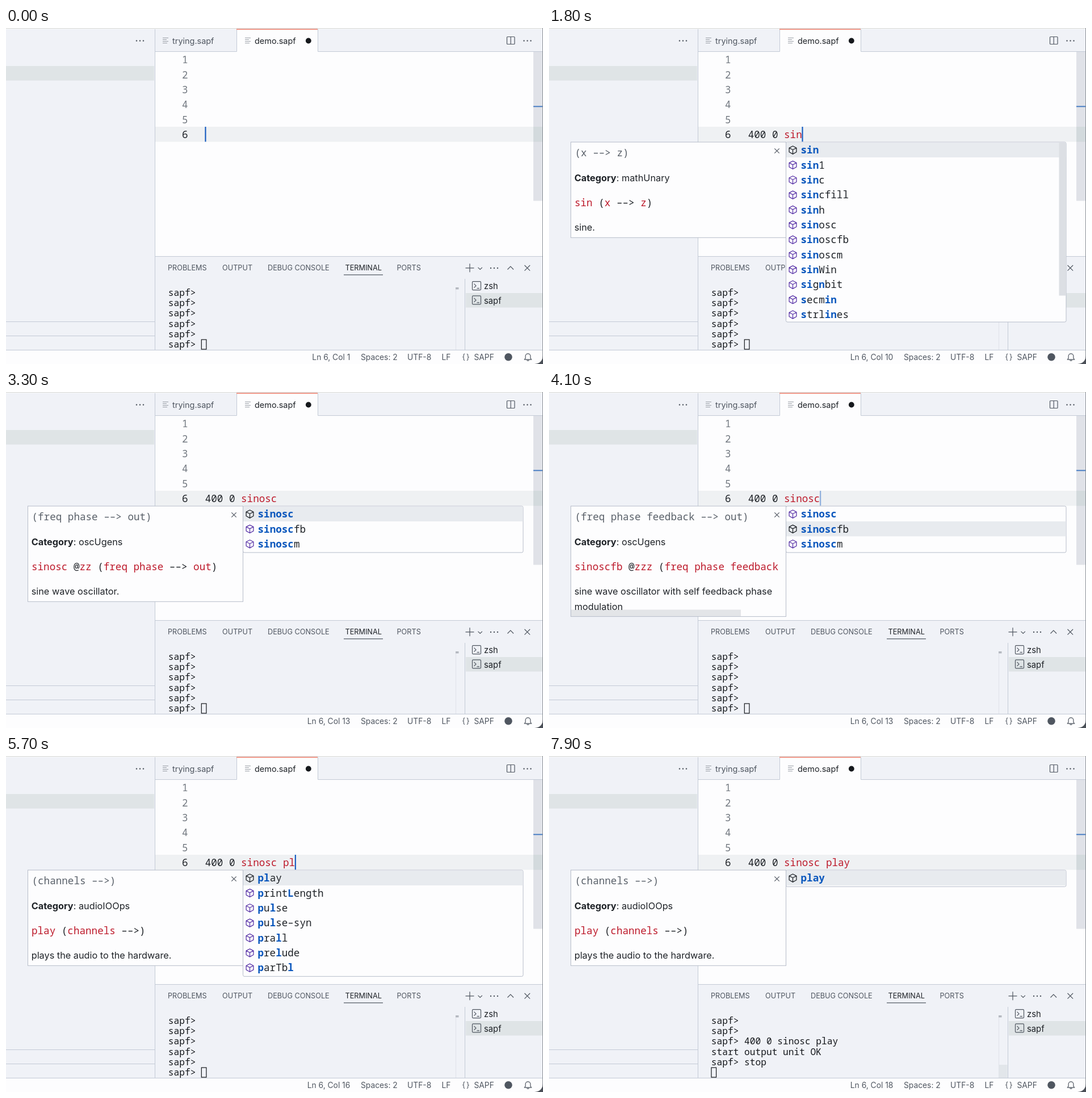
An HTML page that plays this animation: 946x592 px, repeating every 8000 ms.

```html
<!DOCTYPE html>
<html lang="en">
<head>
<meta charset="utf-8">
<title>Editor completion demo</title>
<style>
html, body { margin: 0; width: 100%; height: 100%; overflow: hidden; background: #fdfdfe; }
svg { display: block; }
text { white-space: pre; font: 13.8px Inter, sans-serif; fill: #4f5660; }
.tab { font-size: 14.45px; }
.caps { font-size: 12.7px; }
.side { font-size: 14.8px; fill: #1f2328; }
.code { font: 17.6px "Noto Sans Mono", monospace; fill: #1f2328; }
.term { font: 16.2px "Noto Sans Mono", monospace; fill: #15181c; }
.doc { font-size: 16.3px; fill: #1f2328; }
.red { fill: #bd1a2b; }
.hit { fill: #0a57bd; font-weight: 700; }
.bold { font-weight: 700; }
.on { fill: #1f2328; }
.line { fill: none; stroke: #c3cad6; }
.icon { fill: none; stroke: #4f5660; stroke-width: 1.2; }
</style>
</head>
<body>
<svg width="946" height="592" viewBox="0 0 946 592"><g id="base"></g><g id="live"></g><g id="edge"></g></svg>
<script>
const LOOP = 8000, CHAR = 10.56, ROW = 26.36;
const LINE = '400 0 sinosc play';
const KEYS = [300, 500, 600, 800, 1000, 1200, 1400, 1600, 1800, 2100, 2300, 2600, 5200, 5400, 5600, 5900, 6100];
const SELECT = [3600, 4500], RUN = 6700, STOP = 7700;
const WORDS = ('sin sin1 sinc sincfill sinh sinosc sinoscfb sinoscm sinWin signbit secmin strlines ' +
  'play printLength pulse pulse–syn prall prelude parTbl').split(' ');
const DOCS = {
  sin: ['(x ––> z)', 'mathUnary', 'sin (x ––> z)', 'sine.'],
  sinosc: ['(freq phase ––> out)', 'oscUgens', 'sinosc @zz (freq phase ––> out)', 'sine wave oscillator.'],
  sinoscfb: ['(freq phase feedback ––> out)', 'oscUgens', 'sinoscfb @zzz (freq phase feedback',
    'sine wave oscillator with self feedback phase', 'modulation'],
  play: ['(channels ––>)', 'audioIOOps', 'play (channels ––>)', 'plays the audio to the hardware.']
};

const $ = id => document.getElementById(id);
const esc = s => s.replace(/&/g, '&amp;').replace(/</g, '&lt;').replace(/>/g, '&gt;');
const rect = (x, y, w, h, fill, more = '') => `<rect x="${x}" y="${y}" width="${w}" height="${h}" fill="${fill}" ${more}/>`;
const raw = (x, y, s, cls = '', more = '') => `<text x="${x}" y="${y}" class="${cls}" ${more}>${s}</text>`;
const text = (x, y, s, cls, more) => raw(x, y, esc(s), cls, more);
const path = (d, cls = 'icon', more = '') => `<path d="${d}" class="${cls}" ${more}/>`;
const dot = (x, y, r, fill = '#4f5660') => `<circle cx="${x}" cy="${y}" r="${r}" fill="${fill}"/>`;
const dots = (x, y) => [-6, 0, 6].map(d => dot(x + d, y, 1.2)).join('');
const cross = (x, y, r) => path(`M${x - r} ${y - r}l${2 * r} ${2 * r}m0 ${-2 * r}l${-2 * r} ${2 * r}`);
const paint = s => esc(s).replace(/\b(?!gt;)[a-z]\w*/gi, '<tspan class="red">$&</tspan>');

function base() {
  const panel = '#f0f2f7', row = '#dfe4e6';
  const fileIcon = x => path(`M${x} 17.5h10M${x} 20.5h7M${x} 23.5h10M${x} 26.5h8`, 'icon', 'style="stroke:#989da5;stroke-width:1"');
  const shell = y => `<rect x="821.5" y="${y}" width="15" height="15" rx="1.5" class="icon"/>` +
    path(`M824.5 ${y + 4}l3.5 3.5l-3.5 3.5m5 1h4.5`);
  let s = rect(0, 0, 946, 592, '#fdfdfe') + rect(0, 2, 262, 565, panel) + rect(0, 67, 261, 25.5, row) +
    path('M0 517.5H262M0 542.5H262', 'line') + dots(236, 22.5);

  // Tab strip
  s += rect(262, 2, 684, 39, panel) + rect(406, 2, 143, 40, '#fdfdfe') +
    path('M262 41.5H406.5V2M549.5 2V41.5H946', 'line') + rect(406, 1.5, 143, 1.6, '#ee7b68') +
    fileIcon(276) + text(293, 28, 'trying.sapf', 'tab') +
    fileIcon(421) + text(438, 28, 'demo.sapf', 'tab on') + dot(532.8, 22.5, 4.9, '#15181c') +
    '<rect x="882.5" y="15.5" width="13.5" height="13" rx="1" class="icon"/>' + path('M889.2 15.5v13') + dots(918.5, 22.5);

  // Editor
  s += rect(262, 174, 684, 26.5, '#eff1f3');
  for (let i = 0; i < 6; i++)
    s += text(320.6, 62.3 + i * ROW, String(i + 1), 'code', `text-anchor="end" style="fill:${i < 5 ? '#737981' : '#1f2328'}"`);
  s += rect(929, 42, 16, 262.5, '#e0e2e8') + rect(929, 174, 16, 26.5, '#d3dadd') + rect(929, 137.3, 16, 2, '#4a7fc4');

  // Panel
  s += rect(262, 403, 684, 164, panel) + path('M262 402.5H946M262.5 2V567', 'line');
  [[285, 'PROBLEMS'], [381, 'OUTPUT'], [461, 'DEBUG CONSOLE'], [597.5, 'TERMINAL'], [688.5, 'PORTS']]
    .forEach(([x, name]) => s += text(x, 427.3, name, name === 'TERMINAL' ? 'caps on' : 'caps'));
  s += rect(595, 434.3, 69, 1.2, '#4f5660') +
    path('M809.5 422.8h15M817 415.3v15M831.5 421.8l3.7 3.7l3.7 -3.7M883.5 425.5l5.3 -5.3l5.3 5.3') +
    dots(860, 423) + cross(918.3, 422.8, 4.8) +
    path('M808.5 442V567', 'line') + rect(792, 457, 1, 110, '#e0e3e9') + rect(792, 457, 5.5, 3.5, '#b4b8bf') +
    rect(810, 467, 135, 25.5, row) + shell(446.7) + text(842, 460.3, 'zsh', 'side') + shell(471.9) + text(842, 485.6, 'sapf', 'side');

  // Status bar
  s += path('M0 567.5H946', 'line') + text(625, 585, 'Spaces: 2') + text(707, 585, 'UTF-8') + text(767.5, 585, 'LF') +
    text(803.5, 584.3, '{}', '', 'style="font-size:13px;letter-spacing:2px"') + text(824.5, 585, 'SAPF') +
    dot(885, 579.8, 6.8, '#4f5660') +
    path('M913.5 584.2h12l-1.6 -2.6v-3.4a4.4 4.4 0 0 0 -8.8 0v3.4zM917.7 584.6a1.8 1.8 0 0 0 3.6 0');
  return s;
}

// Indexes of the letters of `query` inside `word`, or null
function match(word, query) {
  const low = word.toLowerCase(), hits = [];
  if (low[0] !== query[0]) return null;
  let from = 0;
  for (const c of query) {
    const at = low.indexOf(c, from);
    if (at < 0) return null;
    hits.push(at);
    from = at + 1;
  }
  return hits;
}

function cube(x, y, color) {
  return path(`M${x} ${y - 7}l6.4 3.3v7.2l-6.4 3.6l-6.4 -3.6v-7.2zM${x - 6.4} ${y - 3.7}l6.4 3.2l6.4 -3.2M${x} ${y - .5}v7.6`,
    'icon', `style="stroke:${color};stroke-width:1.3;stroke-linejoin:round"`);
}

function list(query, picked) {
  const found = WORDS.filter(w => match(w, query)), n = found.length;
  const high = Math.min(n * ROW + 2.8, 317);
  let s = rect(417.5, 201, 493.5, high, '#fdfdfe', 'rx="2.5" stroke="#b6bcc9"') +
    rect(418, 201.6 + picked * ROW, 492.5, ROW, '#e8ebef');
  if (n > 11) s += rect(898.5, 202, 12, 269.5, '#dcdfe4');
  found.forEach((word, i) => {
    const hits = match(word, query), y = 215 + i * ROW;
    const spans = [...word].map((c, k) => hits.includes(k) ? `<tspan class="hit">${c}</tspan>` : c).join('');
    s += cube(429.5, y, i === picked ? '#1f2328' : '#5a35a8') + raw(443.5, y + 6.2, spans, 'code');
  });
  return s + doc(found[picked]);
}

function doc(word) {
  const [sign, kind, usage, ...note] = DOCS[word];
  let s = rect(38.5, 201, 379, 142 + 26.3 * note.length, '#fdfdfe', 'stroke="#b6bcc9"');
  if (note.length > 1) s += rect(39, 383.5, 299, 11.5, '#e3e5e8');
  s += text(45.5, 225.8, sign, 'code', 'style="fill:#596069"') + cross(401.5, 216.5, 4.2) +
    raw(44.7, 270, `<tspan class="bold">Category</tspan>: ${kind}`, 'doc') + raw(45, 314.2, paint(usage), 'code');
  note.forEach((line, i) => s += text(44.7, 357.2 + i * 26.3, line, 'doc'));
  return s;
}

function terminal(t) {
  const lines = Array(6).fill('sapf> ');
  if (t >= RUN) lines.splice(5, 1, 'sapf> ' + LINE, 'start output unit OK', 'sapf> ');
  if (t >= STOP) lines.splice(-1, 1, 'sapf> stop', '');
  const shown = lines.slice(-6);
  return shown.map((line, i) => text(285.8, 471.6 + i * 18.3, line, 'term')).join('') +
    `<rect x="${286 + shown[5].length * 9.72}" y="549" width="8.6" height="17" fill="none" stroke="#15181c" stroke-width="1.2"/>` +
    (t >= RUN ? rect(793, 544, 14.5, 23, '#e2e6ea') : '');
}

function live(t) {
  const n = KEYS.filter(k => k <= t).length, typed = LINE.slice(0, n);
  const query = (typed.match(/[a-z]+$/) || [''])[0];
  const phase = n ? (t - KEYS[n - 1]) % 1000 : 0;
  const glow = phase < 500 ? 1 : phase < 600 ? .45 : 0;
  const picked = t >= SELECT[0] && t < SELECT[1] ? 1 : 0;
  return raw(350.7, 193.8, paint(typed), 'code') +
    rect(350.4 + n * CHAR, 174, 2.1, 26.4, '#1259bf', `opacity="${glow}"`) +
    text(606.3, 585, `Ln 6, Col ${n + 1}`, '', 'text-anchor="end"') +
    terminal(t) + (query ? list(query, picked) : '');
}

$('base').innerHTML = base();
$('edge').innerHTML = rect(0, 0, 946, 1.2, '#d8d9d8') + rect(945, 0, 1, 592, '#8b9096') +
  '<path d="M946 577V592H931Q945 591 946 577Z" fill="#4a4f57"/>';

let last = '';
function frame() {
  const now = live(performance.now() % LOOP);
  if (now !== last) $('live').innerHTML = last = now;
  requestAnimationFrame(frame);
}
frame();
</script>
</body>
</html>
```
